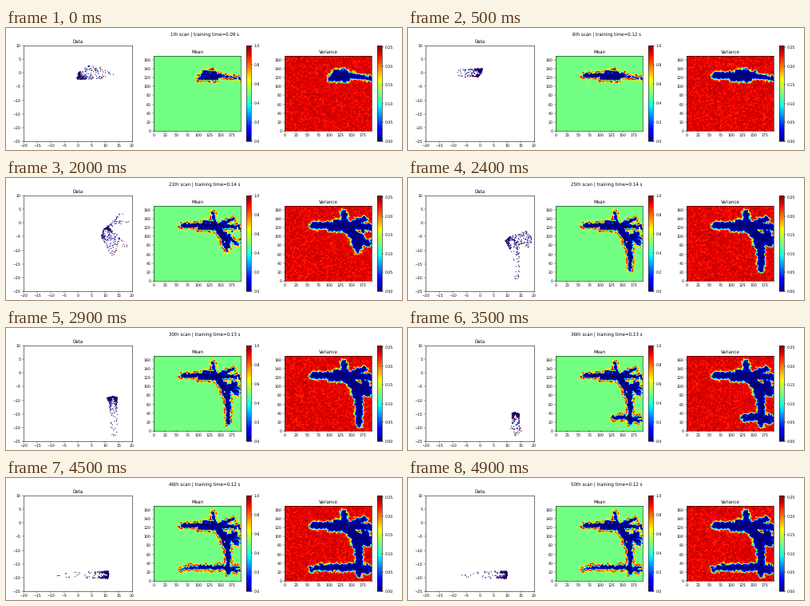
Animation, 496 px wide and 153 px high, one loop 5 s. Source, as a matplotlib script:

```python
import numpy as np
import matplotlib.pyplot as plt
from matplotlib.animation import FuncAnimation

W, H, DPI = 496, 153, 32
SCANS, INTERVAL = 50, 100
NX, NY, RES = 195, 170, 5          # grid cells and cells per metre
ORIGIN = np.array([-20, -25])
V_MAX = 0.2553

plt.rcParams.update({
    "font.family": "DejaVu Sans", "font.size": 10.3,
    "axes.titlesize": 12.4, "axes.titlepad": 6.2,
    "axes.linewidth": 1.2, "text.hinting": "none",
    "xtick.major.width": 0.9, "ytick.major.width": 0.9,
    "xtick.major.size": 3.6, "ytick.major.size": 3.6,
    "xtick.major.pad": 4, "ytick.major.pad": 4.5,
})

# Robot key poses: scan, x, y, heading in degrees
POSES = np.array([
    (0, 0.3, 0, -36), (5, 0.6, 0, -207), (13, 4.1, -0.2, -360),
    (20, 9.7, -2.1, -395), (29, 12.9, -8.6, -450), (36, 13, -15.5, -455),
    (40, 13, -19, -540), (49, 10.1, -18.8, -540),
])

gx, gy = np.meshgrid(np.arange(NX), np.arange(NY))


def smooth_noise(seed, passes):
    noise = np.random.default_rng(seed).normal(size=(NY, NX))
    for _ in range(passes):
        for axis in (0, 1):
            noise = (np.roll(noise, 1, axis) + noise + np.roll(noise, -1, axis)) / 3
    return noise / noise.std()


def strip_distance(start, end, r0, r1):
    (x0, y0), (dx, dy) = start, np.subtract(end, start)
    along = ((gx - x0) * dx + (gy - y0) * dy) / max(dx * dx + dy * dy, 1e-9)
    along = np.clip(along, 0, 1)
    gap = np.hypot(gx - x0 - along * dx, gy - y0 - along * dy)
    return gap - r0 - (r1 - r0) * along


def hall(scan, span, *points, radii):
    """Connected strips, each revealed after the one before."""
    return [(scan + k * span, span, *points[k:k + 2], *radii[k:k + 2])
            for k in range(len(points) - 1)]


def speckles(rng, scan, start, end, count, spread):
    """Small isolated patches scattered along a line."""
    spots = np.linspace(start, end, count) + rng.normal(0, spread, (count, 2))
    return [(scan, 1, p, p, r, r) for p, r in zip(spots, rng.uniform(0.6, 2, count))]


def floor_plan():
    """Strips as (first scan, scans to reveal, start, end, two radii)."""
    rng = np.random.default_rng(4)
    strips = [(0, 1, (101 + 4 * k, 118 + 5 * k), (140 - k, 118 + 5 * k), 2.5, 3)
              for k in range(4)]
    strips += hall(0, 1, (138, 125), (153, 123), radii=(6, 3))
    strips += hall(1, 3, (148, 125), (66, 125), radii=(6, 5))
    strips += hall(14, 6, (142, 124), (165, 88), (167, 16), radii=(7, 5.5, 4))
    strips += hall(34, 3, (167, 30), (110, 30), (58, 27), radii=(5, 4, 0.5))

    # Arms fan out from the junction one after another
    hub = np.array([140, 122])
    angles, lengths = np.radians([105, 2, 25, -40, -66]), [34, 50, 42, 60, 58]
    for first, a, length in zip(np.linspace(8, 17, 5), angles, lengths):
        tip = hub + length * np.array([np.cos(a), np.sin(a)])
        strips.append((int(first), 3, hub, tip, 5, 2.5))

    # Pockets open to the east of the long hall
    for scan, y in ((22, 97), (33, 27)):
        for _ in range(6):
            end = rng.uniform(176, 191), y + rng.uniform(-12, 12)
            strips.append((scan, 3, (167, y), end, 3, rng.uniform(1, 3.5)))

    strips += speckles(rng, 0, (150, 125), (191, 118), 14, 1.8)
    strips += speckles(rng, 17, (165, 105), (188, 90), 9, 5)
    strips += speckles(rng, 37, (58, 27), (110, 31), 14, 1.8)
    return strips


def explored_fields():
    strips = floor_plan()
    field, fields = np.full((NY, NX), 1e3), []
    for scan in range(SCANS):
        for first, span, start, end, r0, r1 in strips:
            if first <= scan < first + span:
                tip = start + (scan - first + 1) / span * np.subtract(end, start)
                field = np.minimum(field, strip_distance(start, tip, r0, r1))
        fields.append(field)
    return fields


FIELDS = explored_fields()
ROUGH = 1.3 * smooth_noise(11, 2)
WALL = np.clip(0.85 + 0.4 * smooth_noise(12, 8), 0, 1)


def step(d, width):
    return 1 / (1 + np.exp(-np.clip(d / width, -40, 40)))


def mean_map(scan):
    d = FIELDS[scan] + ROUGH
    wall = WALL * np.exp(-((d - 3) / 2) ** 2)
    return np.clip(0.49 * step(d - 0.8, 0.5) + 0.5 * wall, 0, 1)


def variance_map(scan):
    rng = np.random.default_rng(500 + scan)
    base = 0.2335 + 0.0055 * smooth_noise(100 + scan, 1)
    base -= 0.02 * (rng.random((NY, NX)) < 0.02)
    edge = step(FIELDS[scan] + 1.2 * ROUGH - 4.2, 0.9)
    return np.clip(base * edge, 0, V_MAX)


def laser_points(scan):
    """Free samples and wall hits of one fan of beams in the explored area."""
    rng = np.random.default_rng(900 + scan)
    x, y, heading = (np.interp(scan, POSES[:, 0], column) for column in POSES.T[1:])
    pose, beams = np.array([x, y]), 64
    angle = np.radians(heading + np.linspace(-78, 78, beams))
    ray = np.stack([np.cos(angle), np.sin(angle)], 1)
    reach = np.arange(0, 23, 0.1)
    cells = (pose + reach[None, :, None] * ray[:, None] - ORIGIN) * RES
    col, row = np.rint(cells).astype(int).transpose(2, 0, 1)
    inside = (col >= 0) & (col < NX) & (row >= 0) & (row < NY)
    field = FIELDS[scan][np.clip(row, 0, NY - 1), np.clip(col, 0, NX - 1)]
    blocked = ~inside | (field > rng.uniform(0.8, 2.2, (beams, 1)))
    blocked[:, :5] = False
    blocked[:, -1] = True
    length = reach[blocked.argmax(1)]

    free = rng.random((beams, 4)) ** 0.6 * length[:, None]
    free_points = (pose + free[..., None] * ray[:, None]).reshape(-1, 2)
    hit = rng.random(beams) < 0.5
    hit_points = pose + length[hit, None] * ray[hit]
    labels = np.repeat([0, 1], [len(free_points), len(hit_points)])
    return np.concatenate([free_points, hit_points]), labels


fig = plt.figure(figsize=(W / DPI, H / DPI), dpi=DPI, facecolor="white")


def add_axes(left, top, right, bottom):
    return fig.add_axes([left / W, 1 - bottom / H, (right - left) / W, (bottom - top) / H])


def add_map(left, title, vmax, ticks):
    ax = add_axes(left, 35, left + 109, 129)
    image = ax.imshow(np.zeros((NY, NX)), cmap="jet", vmin=0, vmax=vmax,
                      origin="lower", aspect="auto")
    ax.set(title=title, xticks=range(0, 176, 25), yticks=range(0, 161, 20))
    bar = add_axes(left + 116, 22, left + 122, 142)
    fig.colorbar(image, cax=bar, ticks=ticks)
    return image


data_ax = add_axes(22, 22, 158, 142)
data_ax.set(title="Data", xlim=(-20, 20), ylim=(-25, 10),
            xticks=range(-20, 21, 5), yticks=range(-25, 11, 5))
dots = data_ax.scatter([], [], c=[], s=7, cmap="jet", vmin=0, vmax=1, linewidths=0)
mean_image = add_map(185, "Mean", 1, np.arange(0, 1.01, 0.2))
variance_image = add_map(349, "Variance", V_MAX, np.arange(0, 0.251, 0.05))
caption = fig.text(248.5 / W, 1 - 8.8 / H, "", ha="center", va="center", fontsize=12.4)


def update(scan):
    seconds = np.interp(scan, [0, 5, 13, 20, 29, 41, 49],
                        [0.09, 0.12, 0.11, 0.14, 0.13, 0.13, 0.12])
    caption.set_text(f"{scan + 1}th scan | training time={seconds:.2f} s")
    points, labels = laser_points(scan)
    dots.set_offsets(points)
    dots.set_array(labels)
    mean_image.set_data(mean_map(scan))
    variance_image.set_data(variance_map(scan))
    return dots, mean_image, variance_image, caption


anim = FuncAnimation(fig, update, frames=SCANS, interval=INTERVAL,
                     repeat=True, repeat_delay=0, blit=False)
plt.show()
```
